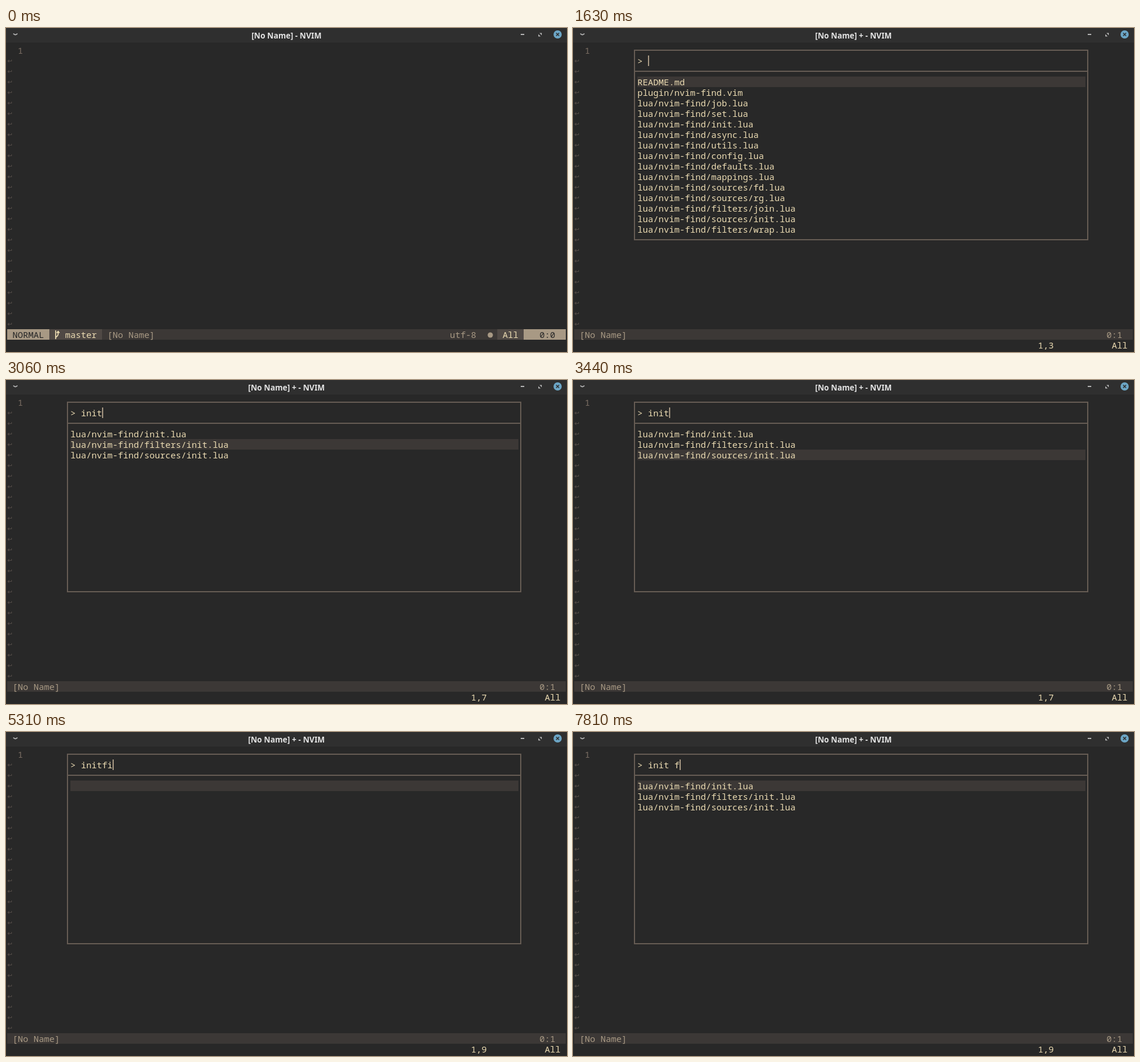
These frames come from a looping animation (958x554 px, 8000 ms). An HTML page:

```html
<!DOCTYPE html>
<html lang="en">
<head>
<meta charset="utf-8">
<title>File finder</title>
<style>
  html, body { margin: 0; width: 100%; height: 100%; overflow: hidden; background: #282828; }
  svg { display: block; }
  text { font: 15px "Noto Sans Mono", monospace; white-space: pre; }
  .title { font: 600 13.33px "Noto Sans", sans-serif; text-anchor: middle; }
</style>
</head>
<body>
<svg id="stage" width="958" height="554" viewBox="0 0 958 554"></svg>
<script>
const LOOP = 8000, CELL_W = 9, CELL_H = 18, LEFT = 2, TOP = 29;
const C = {
  bg: '#282828', bar: '#2f2f2f', line: '#3c3836', segment: '#504945', border: '#665c54',
  number: '#7c6f64', muted: '#a89984', fg: '#ebdbb2', icon: '#b4b4b4', close: '#6ca6c6'
};

const lua = name => `lua/nvim-find/${name}.lua`;
const FILES = ['README.md', 'plugin/nvim-find.vim',
  ...['job', 'set', 'init', 'async', 'utils', 'config', 'defaults', 'mappings', 'sources/fd', 'sources/rg',
    'filters/join', 'sources/init', 'filters/wrap', 'filters/init'].map(lua)];
const MAX_ROWS = 15;

// [time, changes to the state]
const STEPS = [
  [0, { open: false, loaded: false, query: '', row: 0, cursor: true }],
  [500, { open: true }],
  [560, { loaded: true }],
  [1190, { cursor: false }],
  [1630, { cursor: true }],
  [1940, { query: 'i' }],
  [2060, { query: 'in' }],
  [2130, { query: 'ini' }],
  [2380, { query: 'init' }],
  [2940, { cursor: false }],
  [3060, { cursor: true, row: 1 }],
  [3440, { row: 2 }],
  [3810, { row: 1 }],
  [4130, { row: 0 }],
  [4560, { query: 'initf' }],
  [4690, { query: 'initfil' }],
  [5310, { query: 'initfi' }],
  [5440, { query: 'initf' }],
  [5500, { query: 'init' }],
  [5750, { query: 'init ' }],
  [6060, { query: 'init f' }],
  [6310, { query: 'init fi' }],
  [6380, { query: 'init fil' }],
  [6750, { query: 'init filt' }],
  [7310, { cursor: false }],
  [7560, { cursor: true, query: 'init fil' }],
  [7750, { query: 'init fi' }],
  [7810, { query: 'init f' }]
];

const colX = col => LEFT + col * CELL_W;
const rowY = row => TOP + row * CELL_H;
const rect = (x, y, w, h, fill) => `<rect x="${x}" y="${y}" width="${w}" height="${h}" fill="${fill}"/>`;
const path = (d, color, width) => `<path d="${d}" fill="none" stroke="${color}" stroke-width="${width}"/>`;
const block = (col, row, cols, fill) => rect(colX(col), rowY(row), cols * CELL_W, CELL_H, fill);
const escapeText = s => s.replace(/&/g, '&amp;').replace(/</g, '&lt;').replace(/>/g, '&gt;');
const put = (col, row, s, fill = C.fg) =>
  `<text x="${colX(col)}" y="${rowY(row) + 15}" fill="${fill}">${escapeText(s)}</text>`;

function search(query) {
  if (!query) return FILES.slice(0, MAX_ROWS);
  const words = query.trim().split(' ');
  return FILES.filter(file => words.every(word => file.includes(word)))
    .sort((a, b) => a.length - b.length || (a < b ? -1 : 1))
    .slice(0, MAX_ROWS);
}

function windowFrame(title) {
  return rect(0, 0, 958, 25, C.bar) +
    `<text class="title" x="479" y="18" fill="#e4e4e4">${title}</text>` +
    path('M12.5 9.5Q16 13.5 19.5 9.5', C.icon, 1.8) +
    path('M879 11h6', C.icon, 2) +
    `<path d="M911 8.5h4v4zM909 10.5v4h4z" fill="${C.icon}"/>` +
    `<circle cx="942" cy="11" r="7" fill="${C.close}"/>` +
    path('M939.5 8.5l5 5m0-5l-5 5', C.bar, 1.6);
}

function emptyBuffer() {
  let out = put(2, 0, '1', C.number);
  for (let row = 1; row <= 26; row++) {
    const y = rowY(row) + 9.5;
    out += path(`M9.5 ${y - 2.5}V${y}H3.5M5.5 ${y - 2}L3.2 ${y}L5.5 ${y + 2}`, C.segment, 1.1);
  }
  return out;
}

function normalStatus() {
  return block(0, 27, 106, C.line) +
    block(0, 27, 8, C.muted) + put(1, 27, 'NORMAL', C.bg) +
    block(8, 27, 10, C.segment) + put(11, 27, 'master') +
    path('M84.8 517V532M84.8 529Q89 526.5 89 523V519M86.6 521.5L89 518.5L91.4 521.5', C.fg, 1.7) +
    put(19, 27, '[No Name]', C.muted) + put(84, 27, 'utf-8', C.muted) +
    `<circle cx="827" cy="525" r="4.5" fill="${C.muted}"/>` +
    block(93, 27, 5, C.segment) + put(94, 27, 'All') +
    block(98, 27, 8, C.muted) + put(101, 27, '0:0', C.bg);
}

function finderStatus(query) {
  return block(0, 27, 106, C.line) +
    put(1, 27, '[No Name]', C.muted) + put(101, 27, '0:1', C.muted) +
    put(88, 28, `1,${query.length + 3}`) + put(102, 28, 'All');
}

function finder({ loaded, query, row, cursor }) {
  const files = loaded ? search(query) : [];
  return rect(104, 37, 776, 326, C.bg) +
    path('M105 38H879V362H105ZM105 74H879', C.border, 2) +
    block(12, 3 + row, 85, C.line) +
    put(12, 1, '> ' + query) +
    files.map((file, i) => put(12, 3 + i, file)).join('') +
    (cursor ? rect(colX(14 + query.length), rowY(1), 2, CELL_H, C.muted) : '');
}

function draw(state) {
  const title = state.open ? '[No Name] + - NVIM' : '[No Name] - NVIM';
  return windowFrame(title) + emptyBuffer() +
    (state.open ? finderStatus(state.query) + finder(state) : normalStatus());
}

const stage = document.getElementById('stage');
let state = {};
const scenes = STEPS.map(([time, change]) => ({ time, markup: draw(state = { ...state, ...change }) }));
const start = performance.now();
let shown;

function tick() {
  const time = (performance.now() - start) % LOOP;
  const scene = scenes.findLast(s => s.time <= time);
  if (scene !== shown) {
    shown = scene;
    stage.innerHTML = scene.markup;
  }
  requestAnimationFrame(tick);
}
tick();
</script>
</body>
</html>
```
